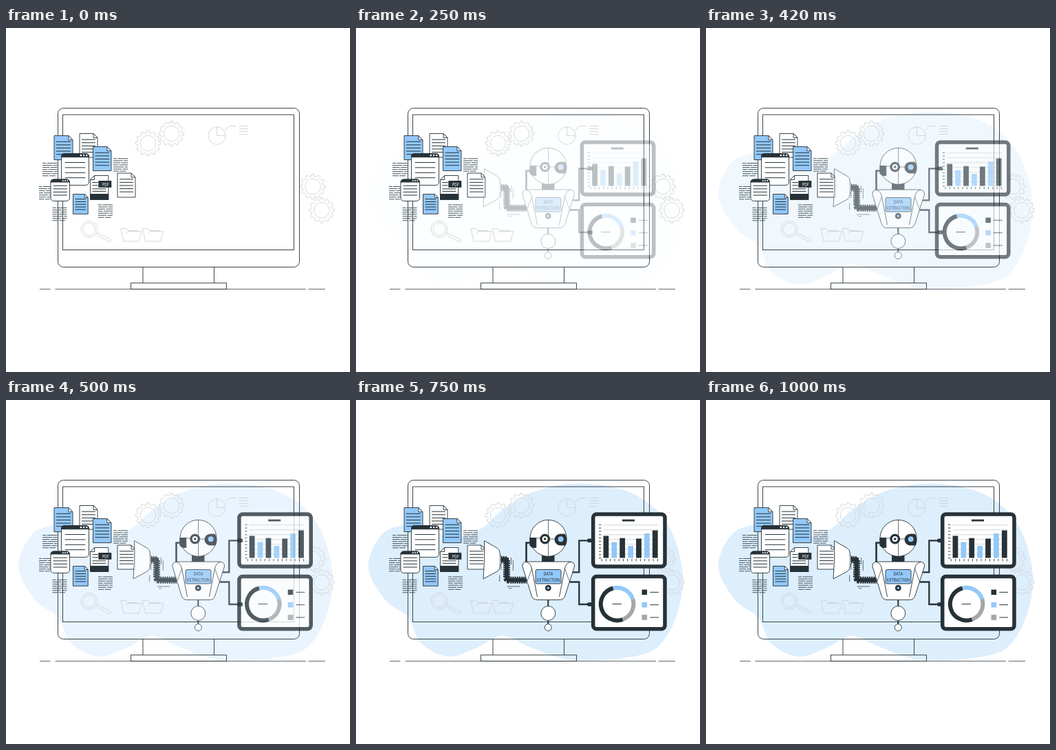
Write an HTML page that moves like this. It is 500 by 500 pixels and loops after 1.04 s.

```html
<!DOCTYPE html>
<html lang="en">
<head>
<meta charset="utf-8">
<title>Data extraction</title>
<style>
  html, body { margin: 0; width: 100%; height: 100%; overflow: hidden; background: #fff; }
  svg { display: block; width: 100%; height: 100%; }
  text { font-family: Roboto, "Liberation Sans", sans-serif; text-anchor: middle; stroke: none; }
</style>
</head>
<body>
<svg id="stage" viewBox="0 0 500 500"></svg>
<script>
const DARK = '#263238', BLUE = '#92c8fa', GRAY = '#a6a6a6', PALE = '#d2d4d5';
const LOOP = 1040, FRAME = 41.6;

const range = n => Array.from({ length: n }, (_, i) => i);
const repeat = (n, draw) => range(n).map(draw).join('');

const path = (d, fill = 'none', stroke = DARK, width = 0.9, extra = '') =>
  `<path d="${d}" fill="${fill}" stroke="${stroke}" stroke-width="${width}" ${extra}/>`;
const box = (x, y, w, h, fill = 'none', stroke = DARK, r = 0, width = 0.9) =>
  `<rect x="${x}" y="${y}" width="${w}" height="${h}" rx="${r}" fill="${fill}" stroke="${stroke}" stroke-width="${width}"/>`;
const block = (x, y, w, h, fill, r = 0) => box(x, y, w, h, fill, 'none', r);
const ring = (x, y, r, fill = 'none', stroke = DARK, width = 0.9) =>
  `<circle cx="${x}" cy="${y}" r="${r}" fill="${fill}" stroke="${stroke}" stroke-width="${width}"/>`;
const label = (x, y, size, fill, text) =>
  `<text transform="translate(${x} ${y}) scale(.69 1)" font-size="${size}" fill="${fill}">${text}</text>`;
const rows = (x, y, w, count, gap, width = 1, stroke = DARK) =>
  path(repeat(count, i => `M${x} ${y + i * gap}h${w}`), 'none', stroke, width);

// Closed smooth curve through a few points
function smoothLoop(points) {
  const n = points.length, at = i => points[(i + n) % n];
  const curve = repeat(n, i => {
    const [a, b, c, d] = [at(i - 1), at(i), at(i + 1), at(i + 2)];
    const k = j => [b[j] + (c[j] - a[j]) / 6, c[j] - (d[j] - b[j]) / 6];
    const [x1, x2] = k(0), [y1, y2] = k(1);
    return `C${x1} ${y1} ${x2} ${y2} ${c[0]} ${c[1]}`;
  });
  return `M${points[0]}${curve}Z`;
}

function gear(cx, cy) {
  const teeth = 12, step = Math.PI * 2 / teeth;
  const spot = (r, a) => `${(cx + r * Math.cos(a)).toFixed(2)} ${(cy + r * Math.sin(a)).toFixed(2)}`;
  const outline = range(teeth).flatMap(i => {
    const a = i * step;
    return [spot(15.4, a - step * 0.27), spot(18.2, a - step * 0.2),
            spot(18.2, a + step * 0.2), spot(15.4, a + step * 0.27)];
  });
  return path(`M${outline.join('L')}Z`, 'none', PALE, 0.9) + ring(cx, cy, 11.3, 'none', PALE);
}

function sheet(x, y, w, h, fill, gap = 4.6) {
  const f = w * 0.23, right = x + w;
  return path(`M${x} ${y}H${right - f}L${right} ${y + f}V${y + h}H${x}Z`, fill) +
    path(`M${right - f} ${y}V${y + f}H${right}Z`, '#fff') +
    rows(x + 3, y + h * 0.25, w - 6, 5, gap);
}

function browser(x, y, w, h, head, r, gap, top) {
  return box(x, y, w, h, '#fff', DARK, r) +
    path(`M${x} ${y + head}V${y + r}q0 ${-r} ${r} ${-r}H${x + w - r}q${r} 0 ${r} ${r}V${y + head}Z`, DARK) +
    repeat(3, i => ring(x + w - 3.3 - i * head * 0.8, y + head / 2, head * 0.25, '#fff', 'none')) +
    rows(x + w * 0.13, y + top, w * 0.74, 4, gap);
}

const note = (x, y, w) => repeat(7, i => {
  const cut = w * (0.25 + ((i * 5) % 7) * 0.08), end = i === 6 ? w * 0.88 : w;
  return path(`M${x} ${y + i * 3.05}h${cut}m1.3 0H${x + end}`, 'none', '#46545b', 1);
});
const notes = (...places) => places.map(p => note(...p).replace ? note(...p) : '').join('');

const folder = x => path(
  `M${x + 4} 310L${x} 291.5h7.5l2 3h14.5v2M${x + 4} 310h22l4.5 -14.5h-20l-2 3`, 'none', PALE);

const monitor = () =>
  box(75.5, 116.5, 351, 231, 'none', DARK, 8) +
  box(82.5, 126, 336, 196.5) +
  path('M199 347.5V371M302.5 347.5V371') +
  box(181.5, 370.7, 139, 8.8) +
  path('M49 379.6H64.5M71.5 379.6H436M439.5 379.6H464', 'none', DARK, 0.75);

const backdrop = () =>
  gear(206.5, 167.5) + gear(240.5, 153.5) + gear(446, 230.5) + gear(459, 265) +
  ring(306.5, 156.5, 12.7, 'none', PALE) +
  path('M306.5 143.8V156.5H319.2M318.5 148.5L324.5 142.5H334', 'none', PALE) +
  rows(339, 142.5, 13, 4, 4, 0.9, PALE) +
  ring(121, 292.3, 12, 'none', PALE) + ring(121, 292.3, 9, 'none', PALE) +
  path('M130.2 300l2 -2.4l19 9q2.5 1.6 1 3.2q-1.5 1.2 -4 .2L131.5 300.6', 'none', PALE) +
  folder(167) + folder(198.5);

const documents = () =>
  notes([53, 196.5, 21.5], [48, 230.5, 18], [67.5, 261.5, 21], [156, 189.8, 21], [134, 257, 21]) +
  sheet(70, 156.5, 27, 35, BLUE) +
  sheet(107, 153.5, 26, 34.5, '#fff') +
  browser(80.5, 182.5, 40, 46, 5.2, 4.5, 7.4, 13) +
  sheet(126.5, 172.5, 26.5, 35, BLUE) +
  browser(65, 220, 27.5, 31.5, 4, 4.5, 4.6, 9.2) +
  sheet(97.5, 241.5, 21.7, 28.8, BLUE, 3.8) +
  path('M128.5 214.5H148.8V249.5H122.5V220.5Z', '#fff') +
  path('M128.5 214.5V220.5H122.5') +
  rows(125.5, 224.5, 8, 2, 4.3) + rows(125.5, 233.8, 20, 2, 3.6) +
  block(134.3, 222, 19, 9.8, DARK) + block(122.2, 241, 27, 8.8, DARK) +
  label(144.8, 229.6, 7.4, '#fff', 'PDF') +
  sheet(162, 211, 26, 35, '#fff');

function panelFrame(y, h) {
  return box(343.7, y + 2.7, 104.3, h - 5.4, '#fff', DARK, 5, 5.5);
}

function barChart() {
  const tops = [197.5, 206.5, 200.7, 212, 201.5, 194, 189.5], base = 229.5;
  return block(386, 173.6, 18, 2.8, DARK) +
    rows(358.5, 181.7, 79.5, 7, 7, 1.8, '#e3e5e6') +
    path(repeat(11, i => `M352 ${181.2 + i * 4.85}h3.4`)) +
    path(repeat(14, i => `M${356.2 + i * 6.25} 231v3.4`)) +
    tops.map((y, i) => block(358.5 + i * 11.9, y, 7.8, base - y, i % 2 ? BLUE : DARK)).join('');
}

function donutChart() {
  const cx = 378.6, cy = 296.6, r = 23.8;
  const arc = (from, to, color) => {
    const p = a => `${cx + r * Math.cos(a * Math.PI / 180)} ${cy + r * Math.sin(a * Math.PI / 180)}`;
    return path(`M${p(from)}A${r} ${r} 0 ${+(to - from > 180)} 1 ${p(to)}`, 'none', color, 6);
  };
  return arc(70, 256, DARK) + arc(256, 342, BLUE) + arc(342, 430, GRAY) +
    rows(371.5, 296.6, 13.5, 1, 0) +
    [DARK, BLUE, GRAY].map((c, i) => block(414.5, 275.6 + i * 18.3, 7.6, 7.6, c)).join('') +
    rows(426.3, 279.4, 12.7, 3, 18.3);
}

const panels = () => panelFrame(163.3, 81.4) + barChart() + panelFrame(253.8, 81.6) + donutChart();

function robot() {
  const tube = 'M210.5 232H219V257.5Q219 261.8 223.5 261.8H248';
  return path('M186.5 204.5L205.5 215.5Q209.3 218 209.3 223V241Q209.3 246.5 205.5 249L185 260Q187.5 232 186.5 204.5Z', '#fff') +
    path('M209.5 226.5q3 0 3 3v6q0 3 -3 3', '#fff') +
    path(tube, 'none', DARK, 6) +
    path(tube, 'none', DARK, 10, 'stroke-dasharray="2.1 1.1"') +
    path('M225.5 229V239M228.3 233V248M208.7 254.5V264M210.8 238v9M219.5 271H238M222 273.8h4', 'none', DARK, 0.7) +
    // cables
    path('M310 250.3H324.3V204.3H338M310 264.5H324.3V297H338', 'none', DARK, 2.3) +
    block(336.5, 201.6, 7.5, 5.4, DARK, 1) + block(336.5, 294.3, 7.5, 5.4, DARK, 1) +
    path('M254 207.5H247.5V237', 'none', DARK, 2.6) +
    // head
    block(270, 225, 18.5, 11, DARK) +
    ring(279.5, 200.8, 26.5, '#fff') +
    path('M279.5 174.3V227.3M253 200.8H268M282 202H290', 'none', DARK, 0.7) +
    path('M252.8 200.5h9v14h-5.5l-3.5 -3Z', DARK) +
    ring(274.7, 202, 7, DARK) + ring(274.7, 202, 4, '#fff', 'none') + ring(274.7, 202, 1.7, DARK, 'none') +
    path('M303.5 195Q308 203 304.5 211H296Q289 209.5 289 202.5Q289.5 195.5 297 195Z', DARK) +
    ring(297.7, 202.3, 4, BLUE, 'none') +
    // body
    path('M248 235H311Q318 235.5 317.5 242L304 284Q302 290.5 296 290.5H263Q257 290.5 255 284L242 242Q241.5 235.5 248 235Z', '#fff') +
    path('M247 235.2Q254 237 255.5 245L263.5 286M312 235.2Q305 237 303.5 245L295.5 286') +
    path('M255.5 245L249 263M303.5 245L310 263', 'none', DARK, 0.7) +
    box(261, 246.5, 37, 20.5, BLUE, DARK, 2) +
    label(279.5, 255.2, 8, DARK, 'DATA') + label(279.5, 263.7, 8, DARK, 'EXTRACTION') +
    ring(279.3, 273.2, 4, DARK) + ring(279.3, 273.2, 1.7, BLUE, 'none') +
    // hanging balls
    path('M279.3 291V300M279.3 320V326', 'none', DARK, 2) +
    ring(279.3, 310, 10.5, '#fff') + ring(279.3, 330.6, 5, '#fff');
}

const blob = () => path(smoothLoop([
  [18, 243], [37, 196], [73, 181.5], [108, 189], [145, 200], [182, 187], [215, 158],
  [262, 132], [328, 121.5], [400, 135], [450, 176], [474, 245], [467, 310], [436, 361],
  [380, 376], [310, 377.5], [255, 360], [212, 342.5], [178, 359], [134, 373],
  [94, 353], [76, 316], [43, 291]
]), '#ddeefd', 'none');

const stage = document.getElementById('stage');
stage.innerHTML = `<g id="blob">${blob()}</g>${monitor()}${backdrop()}${documents()}` +
  `<g id="panels">${panels()}</g><g id="robot">${robot()}</g>`;
const [blobLayer, panelLayer, robotLayer] = ['blob', 'panels', 'robot'].map(id => document.getElementById(id));

const FADE = [[40, 0], [170, 0.14], [330, 0.46], [420, 0.64], [580, 0.92], [660, 1]];
const BLOB_FADE = [[125, 0], [210, 0.04], [330, 0.22], [420, 0.45], [580, 0.85], [670, 1]];
const SLIDE = [[0, -21], [170, -18], [330, -12], [420, -8], [580, -2], [750, 1], [1000, 0], [1040, 0]];

// Hermite curve through [time, value] keys; straight segments when not smooth
function track(keys, t, smooth) {
  const last = keys.length - 1;
  if (t <= keys[0][0]) return keys[0][1];
  if (t >= keys[last][0]) return keys[last][1];
  const i = keys.findIndex(k => k[0] > t) - 1;
  const [t0, v0] = keys[i], [t1, v1] = keys[i + 1], span = t1 - t0, u = (t - t0) / span;
  if (!smooth) return v0 + (v1 - v0) * u;
  const slope = j => {
    const a = keys[Math.max(j - 1, 0)], b = keys[Math.min(j + 1, last)];
    return (b[1] - a[1]) / (b[0] - a[0]) * span;
  };
  const w = u * u * (3 - 2 * u);
  return v0 + (v1 - v0) * w + slope(i) * u * (1 - u) ** 2 - slope(i + 1) * u * u * (1 - u);
}

function render(time) {
  const frame = Math.floor((time % LOOP + 4) / FRAME) % 25;
  const t = frame * FRAME;
  const fade = frame < 2 ? 0 : track(FADE, t);
  panelLayer.setAttribute('opacity', fade);
  robotLayer.setAttribute('opacity', fade);
  blobLayer.setAttribute('opacity', track(BLOB_FADE, t));
  panelLayer.setAttribute('transform', `translate(${track(SLIDE, t, true).toFixed(2)} 0)`);
}

let start;
function tick(now) {
  start ??= now;
  render(now - start);
  requestAnimationFrame(tick);
}
render(0);
requestAnimationFrame(tick);
</script>
</body>
</html>
```
